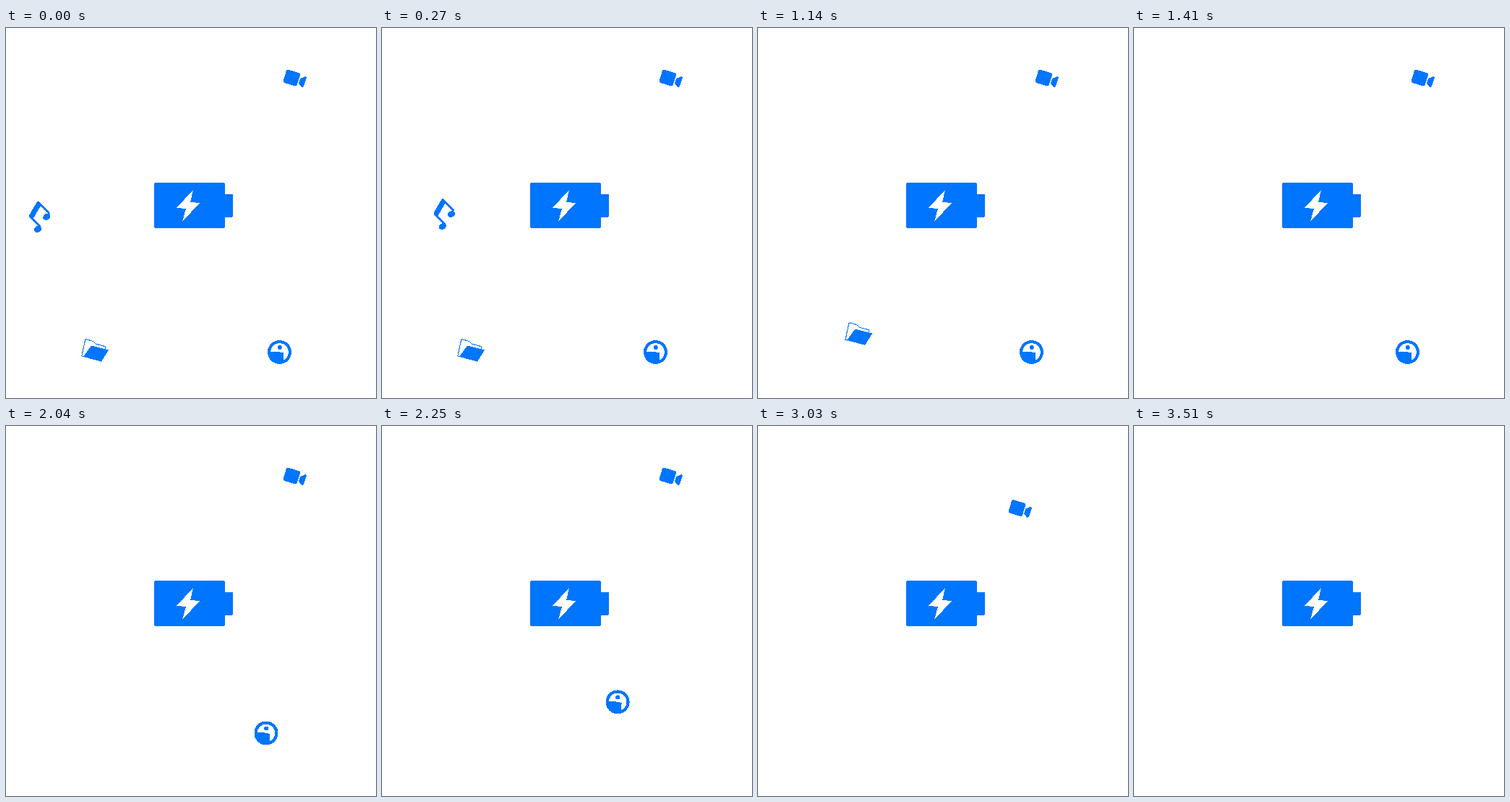
Recreate the animation shown at these times as an HTML page. Size 512 by 512 pixels, loop 3.6 s.

```html
<!DOCTYPE html>
<html lang="en">
<head>
<meta charset="utf-8">
<title>Charging battery</title>
<style>
  html, body { margin: 0; width: 100%; height: 100%; overflow: hidden; background: #fff; }
  svg { display: block; width: 100%; height: 100%; fill: #0075ff; shape-rendering: crispEdges; }
  .line { fill: none; stroke: #0075ff; }
</style>
</head>
<body>
<svg viewBox="0 0 512 512">
  <g id="battery">
    <rect x="205" y="214" width="98" height="63" rx="3"/>
    <rect x="301" y="230" width="13" height="32" rx="2"/>
    <path fill="#fff" d="M259 224L236 249 249 250 244 268 268 242 255 241Z"/>
  </g>
  <g id="note">
    <path d="M43.5 239.5L31.5 260 37.5 264 48 246Z"/>
    <path class="line" stroke-width="2.8" d="M44 240.5L60 257M33 261L47.5 275"/>
    <ellipse cx="56.3" cy="261.3" rx="5.3" ry="4.2" transform="rotate(-25 56.3 261.3)"/>
    <ellipse cx="44" cy="278.4" rx="5.3" ry="4.2" transform="rotate(-25 44 278.4)"/>
  </g>
  <g id="folder">
    <path class="line" stroke-width="1.1" d="M108 455L104.8 454 109.5 432Q110 430.5 112 431L119 433Q122 434 124 437L137.5 440.8V444"/>
    <path d="M118 439.5L142 445.5 132 461.7 107 455Z"/>
  </g>
  <g id="photo">
    <circle class="line" cx="378.5" cy="448.5" r="14.4" stroke-width="4.2"/>
    <circle cx="378.7" cy="442" r="3"/>
    <path d="M365 447.5L376 448 384 449.5 383.5 461A13 13 0 0 1 365 447.5Z"/>
  </g>
  <g id="camera">
    <rect x="385.3" y="59.5" width="20" height="19" rx="2.5" transform="rotate(17 395.3 69)"/>
    <path d="M414.5 67L416 69 411.5 81.5 409 82 405 76.5 407 70Z"/>
  </g>
</svg>
<script>
  const LOOP = 3600, FPS = 30;

  // Each icon glides towards the battery and vanishes midway; times in ticks.
  const icons = [
    { id: 'note',   start: 0,  life: 14, dx: 188,  dy: -18 },
    { id: 'folder', start: 27, life: 15, dx: 97,   dy: -137 },
    { id: 'photo',  start: 54, life: 15, dx: -111, dy: -141 },
    { id: 'camera', start: 81, life: 14, dx: -142, dy: 172 }
  ].map(icon => ({ ...icon, el: document.getElementById(icon.id) }));

  const GLIDE = 27;
  const ease = s => s * s * (3 - 2 * s);

  function draw(ms) {
    const tick = Math.floor((ms % LOOP) * FPS / 1000);
    for (const { el, start, life, dx, dy } of icons) {
      const age = Math.max(0, tick - start);
      const p = ease(Math.min(1, age / GLIDE));
      el.setAttribute('transform', `translate(${dx * p} ${dy * p})`);
      el.setAttribute('visibility', age < life ? 'visible' : 'hidden');
    }
  }

  const t0 = performance.now();
  function loop() {
    draw(performance.now() - t0);
    requestAnimationFrame(loop);
  }
  loop();
</script>
</body>
</html>
```
